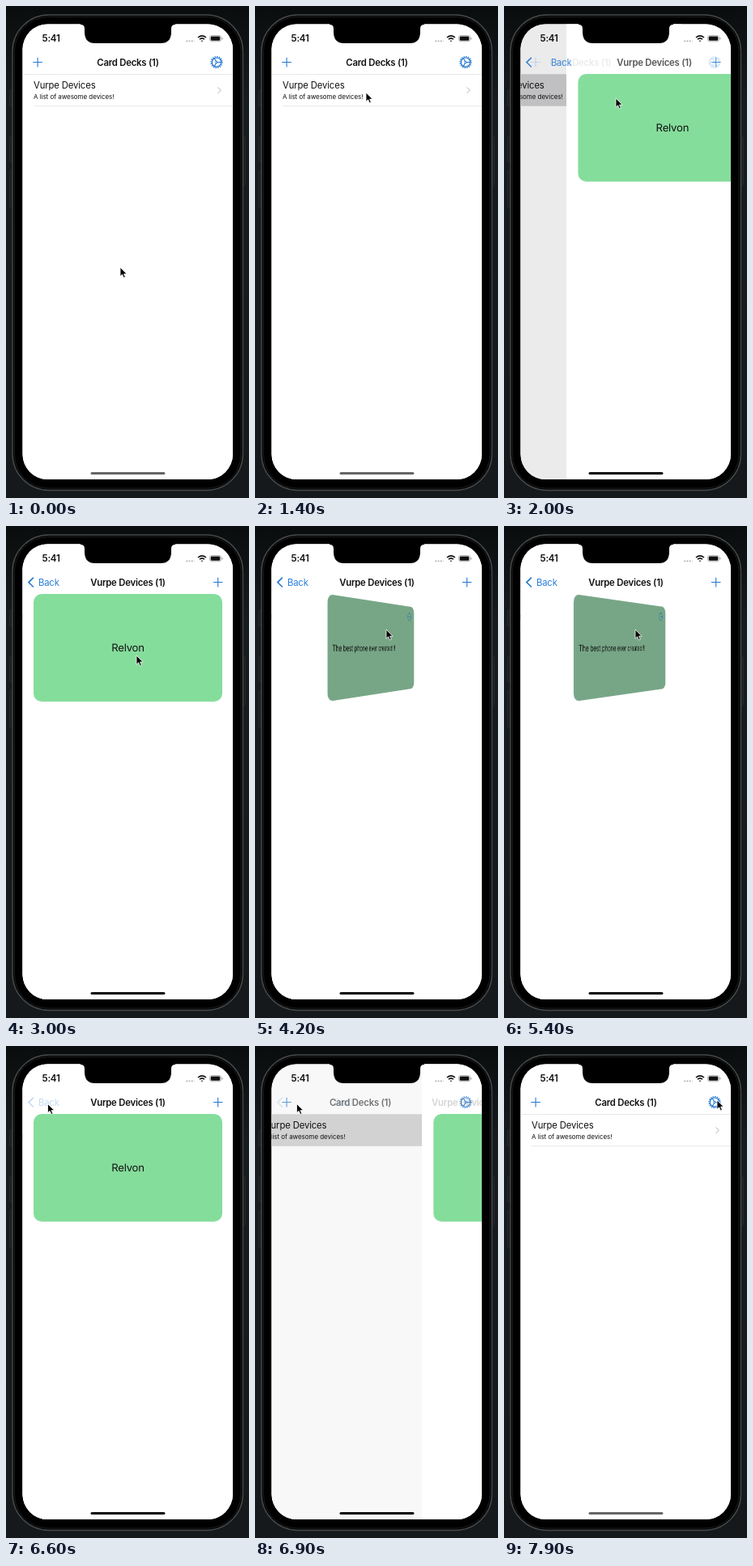
These frames come from a looping animation (300 px wide and 608 px high, 8 s). An HTML page:

```html
<!DOCTYPE html>
<html lang="en">
<head>
<meta charset="utf-8">
<title>Card decks</title>
<style>
html, body { margin: 0; width: 100%; height: 100%; overflow: hidden; background: #14191b; }
#stage { position: relative; width: 300px; height: 608px; overflow: hidden; }
#stage svg, #screen, #detail { position: absolute; left: 0; top: 0; width: 300px; height: 608px; }
#screen { background: #fff; clip-path: inset(22.5px 20px 23px 20.5px round 31px); }
#detail { background: linear-gradient(90deg, transparent 20px, #fff 20px); }
#detail svg.card { left: 34px; top: 84px; width: 233px; height: 133px; overflow: visible; }
text { font-family: Inter, "Liberation Sans", sans-serif; font-size: 11.33px; fill: #111; }
.card text { text-rendering: geometricPrecision; }
.bold { font-weight: 600; letter-spacing: -.22px; }
.blue { fill: none; stroke: #2478d0; stroke-linecap: round; }
</style>
</head>
<body>
<div id="stage">
  <svg viewBox="0 0 300 608">
    <defs>
      <linearGradient id="wall" x2="0" y2="1">
        <stop offset="0" stop-color="#0a0d0e"/><stop offset=".2" stop-color="#171c1e"/>
        <stop offset="1" stop-color="#15191b"/>
      </linearGradient>
    </defs>
    <rect width="300" height="608" fill="url(#wall)"/>
    <g fill="#1d2021" stroke="#303334" stroke-width=".5">
      <rect x="4.5" y="104" width="4" height="20" rx="1"/>
      <rect x="4.5" y="162" width="4" height="31" rx="1"/>
      <rect x="4.5" y="203" width="4" height="46" rx="1"/>
      <rect x="291.5" y="162" width="4" height="59" rx="1"/>
    </g>
    <rect x="8" y="11" width="284.500" height="587.500" rx="45" fill="#050505" stroke="#47494a" stroke-width="1.4"/>
    <rect x="10.500" y="13.500" width="279.500" height="582.500" rx="42" fill="#000" stroke="#191b1c"/>
  </svg>

  <div id="screen">
    <svg id="list" viewBox="0 0 300 608">
      <rect x="20" width="260" height="608" fill="#fff"/>
      <path d="M20 84.500H280" stroke="#e2e2e4" stroke-width=".8"/>
      <rect id="glow" x="20" y="84.500" width="260" height="39.500" fill="#d0d0d2"/>
      <path d="M34 123.500H280" stroke="#e4e4e6" stroke-width=".8"/>
      <text x="34" y="102" letter-spacing="-.15">Vurpe Devices</text>
      <text x="34" y="114.500" style="font-size:8px" letter-spacing="-.05">A list of awesome devices!</text>
      <path d="M261.700 100.500l3.500 3.700-3.500 3.700" fill="none" stroke="#b4b4b8"/>
      <rect id="dim" x="20" width="260" height="608"/>
    </svg>

    <div id="detail">
      <svg id="front" class="card" viewBox="0 0 233 133">
        <rect width="233" height="133" rx="10" fill="#85dd9b"/>
        <text x="116.500" y="71.300" text-anchor="middle" style="font-size:13.1px" letter-spacing="-.2">Relvon</text>
      </svg>
      <svg id="back" class="card" viewBox="0 0 233 133">
        <rect width="233" height="133" rx="10" fill="#88be9a"/>
        <text x="10" y="71" letter-spacing="-.15">The best phone ever created!!!</text>
        <g class="blue">
          <circle cx="217" cy="16.500" r="6"/>
          <path d="M214 16.500h.1m2.900 0h.1m2.900 0h.1" stroke-width="1.4"/>
        </g>
      </svg>
    </div>

    <svg viewBox="0 0 300 608">
      <path id="addDeck" class="blue" d="M33.700 69.500h10.800m-5.400-5.400v10.800" stroke-width="1.1"/>
      <text id="listTitle" class="bold" x="150.500" y="73.500" text-anchor="middle">Card Decks (1)</text>
      <g id="gear" class="blue" stroke-width="1.1">
        <circle cx="260" cy="69.500" r="5.700" stroke-width="1.3"/>
        <circle cx="260" cy="69.500" r="7" stroke-width="1.3" stroke-dasharray="1.4 1.35" stroke-linecap="butt"/>
        <circle cx="260" cy="69.500" r="1.300" stroke-width=".9"/>
        <path d="M261.400 69.500h4.200M259.300 68.300l-2.100-3.700M259.300 70.700l-2.100 3.700"/>
      </g>
      <path id="chevron" class="blue" d="M33.500 64.200l-5.600 5.400 5.600 5.400" stroke-width="1.6"/>
      <text id="backLabel" x="40" y="73.500" letter-spacing="-.2" style="fill:#2a7fd8">Back</text>
      <text id="title" class="bold" x="150.500" y="73.500" text-anchor="middle">Vurpe Devices (1)</text>
      <path id="addCard" class="blue" d="M256.300 69.500h10.800m-5.400-5.400v10.800" stroke-width="1.1"/>
    </svg>
  </div>

  <svg viewBox="0 0 300 608">
    <path d="M92 21.500v1.500q5 0 5 5v4q0 14 13 14h81q13 0 13-14v-4q0-5 5-5v-1.500z"/>
    <text x="44.500" y="44.200" class="bold" style="font-size:11.6px">5:41</text>
    <path d="M222.500 43.300h10" stroke="#aaa" stroke-width="1.700" stroke-dasharray="1.700 1.500"/>
    <g fill="none" stroke="#111" stroke-width="1.600">
      <path d="M237 39q5-4.400 10 0M239 41.200q3-2.600 6 0"/>
      <path d="M241.300 43.300h1.400"/>
    </g>
    <rect x="251.500" y="36.500" width="14" height="7.300" rx="2.200" fill="none" stroke="#999" stroke-width=".7"/>
    <rect x="252.700" y="37.600" width="11.600" height="5.100" rx="1.300" fill="#111"/>
    <path d="M267 38.800v2.600" stroke="#999"/>
    <rect id="home" x="104.500" y="575.900" width="92" height="3.200" rx="1.600"/>
    <path id="cursor" d="M0 0V11.200L2.600 8.800 4.400 12.900 6.300 12.100 4.600 8.100H8.200Z"
      fill="#050505" stroke="#fff" stroke-width=".8" stroke-linejoin="round"/>
  </svg>
</div>

<script>
const LOOP = 8000;
const ROW_TAP = 1550, PUSH = 1750, BACK_TAP = 6450, POP = 6680, SETTLE = 600;
const OPEN = 3894, CLOSE = 5212, FLIP = 500;

// time, x, y of the pointer tip
const POINTER = [
  [0, 141, 323], [200, 141, 323], [900, 137, 107], [1600, 137, 107],
  [2000, 138, 114], [2300, 138, 114], [2700, 161, 160], [3100, 161, 160],
  [3600, 162, 128], [5800, 162, 128], [6350, 51.5, 71.5], [7250, 51.5, 71.5],
  [7800, 263, 67], [LOOP, 263, 67]
];

const el = {};
document.querySelectorAll("[id]").forEach(e => el[e.id] = e);

const clamp = v => Math.min(1, Math.max(0, v));
const ease = v => (1 - Math.cos(Math.PI * clamp(v))) / 2;
const fade = (e, v) => { e.style.opacity = clamp(v); };
const shift = (e, x, y = 0) => { e.style.transform = `translate(${x}px, ${y}px)`; };

// critically damped spring
function spring(ms) {
  if (ms <= 0) return 0;
  if (ms > SETTLE + 150) return 1;
  const k = ms * 0.0114;
  return 1 - (1 + k) * Math.exp(-k);
}

function movePointer(t) {
  const i = POINTER.findIndex(p => p[0] > t);
  const [a, b] = [POINTER[i - 1], POINTER[i]];
  const k = ease((t - a[0]) / (b[0] - a[0]));
  shift(el.cursor, a[1] + (b[1] - a[1]) * k, a[2] + (b[2] - a[2]) * k);
}

function navigate(t) {
  const p = spring(t - PUSH) - spring(t - POP);
  const rest = 1 - p;
  shift(el.list, -78 * p);
  shift(el.detail, 260 * rest);
  fade(el.dim, 0.1 * p);
  const selected = t >= ROW_TAP && t < POP + SETTLE;
  fade(el.glow, selected ? 1 - ease((t - POP - 100) / 450) : 0);

  fade(el.addDeck, rest);
  fade(el.gear, rest);
  fade(el.addCard, p);
  shift(el.listTitle, -72 * p);
  fade(el.listTitle, rest ** 1.7);
  shift(el.title, 159 * rest);
  fade(el.title, p ** 1.4);

  const press = t >= BACK_TAP ? 0.28 : 1;
  shift(el.backLabel, 81 * rest);
  fade(el.backLabel, Math.sqrt(clamp(p)) * press);
  fade(el.chevron, Math.sqrt(clamp(p)) * press);
  el.home.style.fill = t < PUSH || t > POP + SETTLE ? "#666" : "#050505";
}

function flipCard(t) {
  const turn = 180 * (ease((t - OPEN) / FLIP) - ease((t - CLOSE) / FLIP));
  const sin = Math.sin(turn * Math.PI / 180);
  const pose = (card, angle, shown) => {
    card.style.visibility = shown ? "visible" : "hidden";
    card.style.transform = sin < 0.001 ? "none"
      : `perspective(600px) translateZ(${-116.5 * sin}px) rotateY(${angle}deg)`;
    card.style.filter = sin < 0.001 ? "none" : `brightness(${1 - 0.15 * sin})`;
  };
  pose(el.front, -turn, turn < 90);
  pose(el.back, 180 - turn, turn >= 90);
}

function render(t) {
  movePointer(t);
  navigate(t);
  flipCard(t);
}

const start = performance.now();
function tick() {
  render((performance.now() - start) % LOOP);
  requestAnimationFrame(tick);
}
tick();
</script>
</body>
</html>
```
